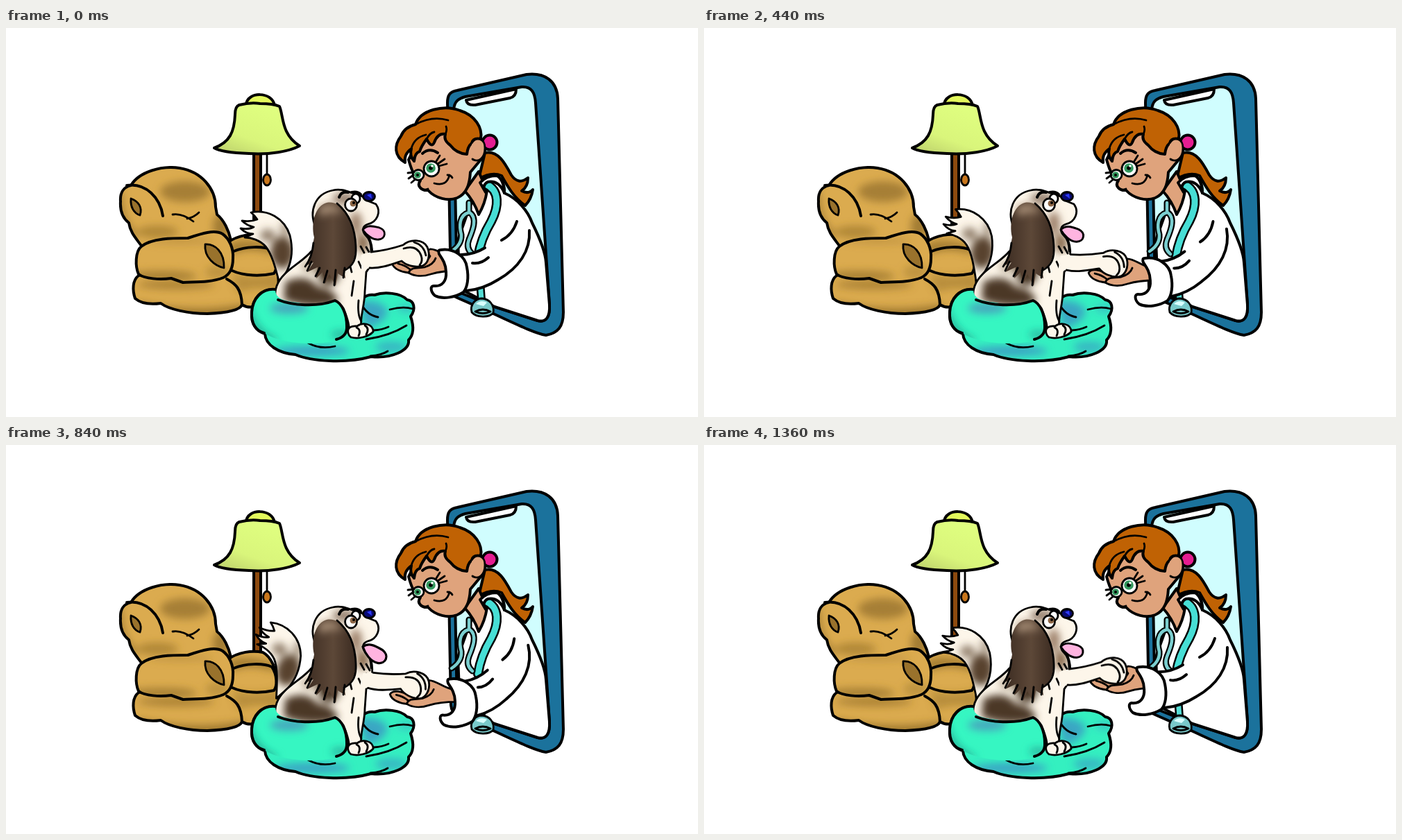
An HTML page that plays this animation: 997x561 px, repeating every 1400 ms.

```html
<!DOCTYPE html>
<html lang="en">
<head>
<meta charset="utf-8">
<title>Vet on the phone</title>
<style>
  html, body { margin: 0; height: 100%; overflow: hidden; background: #fff; }
  svg { display: block; width: 100%; height: 100%; }
  .ink { stroke: #000; stroke-width: 4; stroke-linejoin: round; stroke-linecap: round; }
  .thin { stroke-width: 2.8; }
  .line { fill: none; }
  .soft { filter: url(#blur); }
  .skin { fill: #dfa37c; }
  .hair { fill: #c06204; }
  .fur { fill: #fdf6ea; }
  .white { fill: #fff; }
</style>
</head>
<body>
<svg viewBox="0 0 997 561">
  <defs>
    <filter id="blur" x="-50%" y="-50%" width="200%" height="200%"><feGaussianBlur stdDeviation="6"/></filter>
    <linearGradient id="shadeFill" x1="0" y1="1" x2=".6" y2="0">
      <stop stop-color="#b9cc69"/><stop offset=".4" stop-color="#d9f57b"/><stop offset="1" stop-color="#e0ff80"/>
    </linearGradient>
    <linearGradient id="earFill">
      <stop stop-color="#3b2b21"/><stop offset=".55" stop-color="#5d4838"/><stop offset="1" stop-color="#3b2b21"/>
    </linearGradient>
    <path id="back" d="M180 227C192 207 225 198 250 202C282 207 302 232 302 258L304 269C314 277 321 292 324 306L300 330L195 314C187 303 179 295 177 281C168 274 164 265 165 250C164 237 170 229 180 227Z"/>
    <path id="seat" d="M318 310C335 298 355 296 370 299C382 305 390 324 392 345L393 380L357 402Q348 404 340 399C337 408 315 411 290 412C263 412 235 406 223 397C208 399 194 397 186 390C182 378 182 364 191 357Z"/>
    <path id="armrest" d="M195 315C210 303 240 303 262 303C280 297 300 290 312 297C322 304 328 318 327 332C327 346 322 356 313 360C296 367 272 366 255 367L238 361C222 363 200 362 191 355C186 344 186 322 195 315Z"/>
    <path id="tailShape" d="M394 368C388 345 383 326 374 315C366 306 353 302 344 302L356 297Q346 297 338 289Q350 291 357 287Q347 285 340 278Q352 280 362 276Q358 270 353 266C377 261 401 274 409 299C414 319 411 337 405 350Z"/>
    <path id="body" d="M440 322C425 340 398 350 390 372C384 388 392 400 402 404L486 404C492 418 496 430 494 440L512 432C509 420 517 400 517 380L519 352C529 340 531 318 522 300L490 275Z"/>
    <path id="head" d="M445 285C436 264 445 239 471 234C483 231 493 236 502 239C510 240 516 243 523 250L533 254C541 265 535 280 521 283C513 286 512 293 519 300C524 307 526 314 526 322L490 350L445 330Z"/>
    <path id="lobe" d="M388 377C369 375 355 390 354 410C353 426 360 437 372 440C395 455 440 458 472 452C486 450 492 442 491 430C491 412 484 397 474 393C457 401 438 400 420 396C400 394 388 390 388 377Z"/>
    <path id="bed" d="M385 378C368 376 355 390 354 410C353 426 360 437 373 441C374 457 392 469 417 471C440 481 490 484 526 474C556 477 582 465 580 450C590 440 586 425 583 416C591 405 588 393 578 392C569 382 545 380 531 385C519 383 511 391 507 400L400 400Z"/>
    <clipPath id="inBack"><use href="#back"/></clipPath>
    <clipPath id="inSeat"><use href="#seat"/></clipPath>
    <clipPath id="inArmrest"><use href="#armrest"/></clipPath>
    <clipPath id="inTail"><use href="#tailShape"/></clipPath>
    <clipPath id="inBody"><use href="#body"/></clipPath>
    <clipPath id="inHead"><use href="#head"/></clipPath>
    <clipPath id="inLobe"><use href="#lobe"/></clipPath>
    <clipPath id="inBed"><use href="#bed"/></clipPath>
  </defs>

  <g id="lamp" class="ink">
    <path d="M357 180H367V302H357Z" fill="#8d4a0e"/>
    <path class="line thin" d="M376 181V212"/>
    <ellipse class="thin" cx="376" cy="219" rx="5.5" ry="8" fill="#c8761c"/>
    <path d="M346 111C347 91 384 91 387 112Z" fill="#e3f95c"/>
    <path d="M336 111Q352 107 366 109Q385 109 394 113C400 126 396 153 423 170C408 178 380 183 350 181C325 180 308 178 300 173C322 165 329 150 330 125Q330 113 336 111Z" fill="url(#shadeFill)"/>
  </g>

  <g id="chair">
    <use href="#seat" fill="#dbab4f"/>
    <g clip-path="url(#inSeat)"><g class="soft" fill="#8f6b28">
      <path d="M320 312Q350 300 390 318L385 326Q350 314 325 326Z" opacity=".8"/>
      <path d="M325 355Q360 362 395 352V380Q360 370 335 382Z" opacity=".45"/>
      <path d="M190 395Q270 412 345 398V425H190Z" opacity=".8"/>
      <ellipse cx="245" cy="370" rx="55" ry="7" opacity=".6"/>
    </g></g>
    <use href="#seat" class="ink line"/>
    <use href="#back" fill="#dbab4f"/>
    <g clip-path="url(#inBack)"><g class="soft" fill="#94702b">
      <ellipse cx="258" cy="236" rx="36" ry="15" opacity=".75"/>
      <ellipse cx="218" cy="294" rx="30" ry="9" opacity=".6"/>
      <path d="M167 232Q165 270 190 300L178 302L155 245Z" opacity=".8"/>
      <ellipse cx="310" cy="286" rx="12" ry="18" opacity=".8"/>
    </g></g>
    <use href="#back" class="ink line"/>
    <use href="#armrest" fill="#dbab4f"/>
    <g clip-path="url(#inArmrest)"><g class="soft" fill="#94702b">
      <ellipse cx="225" cy="358" rx="50" ry="8" opacity=".7"/>
      <ellipse cx="250" cy="307" rx="48" ry="5" opacity=".35"/>
      <ellipse cx="305" cy="352" rx="18" ry="10" opacity=".4"/>
    </g></g>
    <use href="#armrest" class="ink line"/>
    <g class="ink line">
      <path d="M174 227C202 223 222 245 226 271"/>
      <path class="thin" d="M240 269C251 267 262 273 270 279M261 275Q271 273 278 266"/>
      <path d="M328 322C345 315 370 314 383 320C391 332 391 348 386 354C368 358 343 358 326 350"/>
      <path d="M318 362C331 369 339 376 340 399"/>
    </g>
    <path class="ink thin" d="M180 246C191 250 197 259 193 270C184 267 179 258 180 246ZM287 312C301 311 315 323 314 346C301 343 285 331 287 312Z" fill="#99722c"/>
  </g>

  <g id="tail">
    <use href="#tailShape" class="fur"/>
    <g clip-path="url(#inTail)"><g class="soft" fill="#59432d">
      <ellipse cx="398" cy="324" rx="17" ry="23"/>
      <ellipse cx="377" cy="299" rx="11" ry="9" opacity=".65"/>
      <ellipse cx="402" cy="290" rx="7" ry="12" opacity=".5"/>
    </g></g>
    <use href="#tailShape" class="ink thin line"/>
  </g>

  <g id="petBed">
    <use href="#bed" fill="#34f0c0"/>
    <g clip-path="url(#inBed)"><g class="soft" fill="#3a9fc4">
      <path d="M508 394Q540 390 550 408Q545 428 518 433Z" opacity=".9"/>
      <ellipse cx="440" cy="466" rx="55" ry="7"/>
      <ellipse cx="555" cy="460" rx="23" ry="8" opacity=".7"/>
      <ellipse cx="577" cy="405" rx="13" ry="4" opacity=".8"/>
    </g></g>
    <use href="#bed" class="ink line"/>
    <path class="ink thin line" d="M512 398Q520 414 536 417M553 406Q572 401 586 405M519 449Q553 444 577 429M530 436Q543 435 551 431M435 454Q452 464 474 459M525 473Q541 472 550 466"/>
  </g>

  <g id="dog">
    <use href="#body" class="fur"/>
    <g clip-path="url(#inBody)"><g class="soft">
      <path d="M402 366Q433 352 449 373Q480 378 477 398Q434 406 400 392Z" fill="#4b3826"/>
      <ellipse cx="440" cy="344" rx="15" ry="9" fill="#8e7960" opacity=".6"/>
      <ellipse cx="465" cy="350" rx="16" ry="22" fill="#4a3727"/>
      <ellipse cx="515" cy="311" rx="7" ry="14" fill="#8c694b"/>
    </g></g>
    <use href="#body" class="ink thin line"/>
    <use href="#lobe" fill="#36f6c2"/>
    <g clip-path="url(#inLobe)"><g class="soft">
      <ellipse cx="408" cy="404" rx="28" ry="8" fill="#47a6bd"/>
      <ellipse cx="482" cy="442" rx="14" ry="6" fill="#239b91" opacity=".7"/>
      <path d="M350 395Q358 437 395 450L370 455L345 415Z" fill="#23a28f" opacity=".85"/>
    </g></g>
    <path class="ink line" d="M388 377C369 375 355 390 354 410C353 426 360 437 372 440M392 392C412 400 448 403 474 393C484 397 491 412 491 430Q492 445 476 449"/>
    <path class="ink thin fur" d="M493 440C491 432 498 429 506 430C513 424 529 426 529 438C523 445 508 449 497 446Q494 444 493 440Z"/>
    <path class="ink thin line" d="M505 432Q512 435 508 444M517 429Q524 433 519 442M508 393Q506 414 512 423M501 365L498 386"/>

    <use href="#head" class="fur"/>
    <g clip-path="url(#inHead)"><g class="soft">
      <ellipse cx="487" cy="246" rx="17" ry="8" fill="#60452e" opacity=".7"/>
      <ellipse cx="504" cy="282" rx="9" ry="17" fill="#7d5c40" opacity=".75"/>
      <ellipse cx="514" cy="310" rx="9" ry="14" fill="#85664a"/>
    </g></g>
    <path class="ink thin line" d="M446 287C436 264 445 239 471 234C483 231 493 236 502 239Q514 241 523 250L533 254C541 265 535 280 521 283C513 286 512 293 519 300Q526 306 526 322"/>
    <path d="M462 252C446 256 439 280 444 302C440 323 440 331 431 343L443 338L434 352L449 345L447 361L456 352L460 369L466 355L475 372L478 354L489 361L487 348C505 343 506 315 502 296C499 270 481 248 462 252Z" fill="url(#earFill)"/>
    <path class="soft" d="M450 258Q472 247 486 268Q472 262 453 272Z" fill="#a58c74"/>
    <path class="ink thin line" d="M477 253C495 268 503 290 504 315C505 332 501 343 487 350M443 310Q441 331 431 344M440 337L434 350M452 346L446 358M463 350L458 367M475 349L473 371M488 346L486 360M496 344L498 352M511 315L516 324M519 316L524 325M508 337L512 346M519 330L524 340"/>
    <ellipse class="ink thin white" cx="504" cy="246" rx="6" ry="7"/>
    <ellipse class="ink thin white" cx="497" cy="255" rx="8.5" ry="9"/>
    <circle cx="500" cy="253" r="4.5" fill="#8c6544"/>
    <circle cx="501" cy="252" r="2"/>
    <path class="ink line" d="M480 244Q483 235 493 237M498 237Q506 235 511 240"/>
    <ellipse class="ink thin" cx="523" cy="243" rx="8.5" ry="6.5" fill="#090b76"/>
    <path d="M520 241L526 239L527 246Z" fill="#2e3bff"/>
    <path id="tongue" class="ink thin" d="M514 291C520 283 530 286 538 288C549 292 547 304 537 305C528 306 519 298 514 291Z" fill="#ffb4e0"/>
  </g>

  <g id="phone" class="ink">
    <path d="M636 108C636 96 640 92 650 90L750 67C776 64 794 76 795 102L803 410C803 431 795 440 778 443C761 440 735 427 700 411L650 389Q642 386 641 375Z" fill="#1b729c"/>
    <path d="M645 118C646 106 651 102 662 99L743 85C757 84 762 93 763 108L783 399C784 417 778 425 766 422L704 402L650 380Z" fill="#d0fdfe"/>
    <path class="white" d="M663 104Q664 112 676 111L726 101Q735 99 735 88Z"/>
  </g>

  <g id="doctor">
    <path class="ink hair" d="M690 180C709 176 719 195 728 212Q738 227 752 216Q752 229 743 235Q753 240 759 233Q757 247 748 256C732 245 723 229 714 213Q699 207 681 218Z"/>
    <path class="ink white" d="M688 218C702 207 719 214 718 238C737 246 752 264 758 281C769 303 777 323 778 338L783 399C784 417 778 425 766 422L704 402L654 376L651 306L668 258Z"/>
    <path class="ink skin" d="M661 235Q674 249 681 269Q690 254 693 235L681 207Z"/>
    <path class="ink skin" d="M580 190C584 203 586 212 597 220C591 228 599 235 608 234C619 246 637 250 650 245C664 239 668 225 669 208L684 190C698 166 688 154 671 162L642 145L600 150Z"/>
    <path class="ink hair" d="M575 194C559 185 559 169 569 156Q574 143 590 139C597 118 631 110 654 119C676 126 687 144 684 160Q673 158 671 166Q665 171 664 182Q649 181 640 169Q630 162 633 153Q622 151 617 165Q613 174 606 160Q598 171 596 178Q589 180 588 192Q581 185 584 174Q573 182 575 194Z"/>
    <path class="ink line thin" d="M590 139Q614 126 637 133M584 174Q588 158 605 154M606 160Q611 151 617 150M633 153Q636 147 634 142M674 177Q681 168 686 175M673 190Q679 184 681 190"/>
    <path class="ink line" d="M600 181Q610 172 622 180"/>
    <circle class="ink" cx="697" cy="165" r="10.5" fill="#e51d91"/>
    <path class="ink skin thin" d="M671 166C677 156 690 159 690 173C690 187 681 195 672 189"/>
    <g class="ink thin">
      <ellipse class="white" cx="594" cy="212" rx="8" ry="7.5"/>
      <ellipse class="white" cx="613" cy="203" rx="11" ry="11"/>
      <path class="line" d="M622 196L632 189M624 199L635 196M588 208L579 209M587 212L580 217M590 218L584 223M620 192L625 184"/>
      <path class="line" d="M597 220C590 227 599 236 608 232M617 224Q635 229 639 212M636 212Q641 212 643 216"/>
    </g>
    <circle cx="593" cy="212" r="4.8" fill="#33985e"/>
    <circle cx="612" cy="202" r="6.8" fill="#33985e"/>
    <circle cx="593" cy="212" r="2"/><circle cx="612" cy="202" r="2.8"/>
    <circle cx="614" cy="199" r="1.8" fill="#fff"/>

    <g class="line" stroke-linecap="round">
      <path d="M691 225C712 234 710 258 699 279Q684 304 680 330" stroke="#000" stroke-width="14"/>
      <path d="M691 225C712 234 710 258 699 279Q684 304 680 330" stroke="#47ded5" stroke-width="9"/>
      <path d="M667 252V264M667 266C652 270 653 287 656 298Q657 312 642 322M668 266C680 274 672 293 667 305Q662 318 672 326" stroke="#000" stroke-width="9"/>
      <path d="M667 252V264M667 266C652 270 653 287 656 298Q657 312 642 322M668 266C680 274 672 293 667 305Q662 318 672 326" stroke="#7bcfd0" stroke-width="4.5"/>
      <path d="M683 366L685 392" stroke="#000" stroke-width="12"/>
      <path d="M683 366L685 392" stroke="#55ddd5" stroke-width="7"/>
    </g>
    <path class="ink white" d="M683 223Q692 213 707 213Q717 218 718 238Q710 219 694 222Q685 227 691 237Z"/>
    <path class="ink thin" d="M671 410C668 398 677 390 686 390C697 391 704 400 702 411C696 418 678 418 671 410Z" fill="#79c9ca"/>
    <path d="M677 398Q684 391 693 396L688 401Z" fill="#d9ffff"/>
    <path class="ink thin line" d="M676 409Q687 403 698 409Q687 414 676 409Z"/>

    <g id="hand">
      <path class="ink skin thin" d="M556 339C560 332 574 335 584 341C600 340 609 334 611 329Q604 321 611 319C621 318 632 329 646 332L652 350C633 350 622 352 612 355C600 359 588 358 580 353C569 352 558 347 556 339Z"/>
      <path class="ink line thin" d="M580 353C583 344 594 347 603 345Q616 341 619 332M565 340Q575 342 582 348"/>
    </g>
    <g id="sleeve">
      <path class="white" d="M650 325Q676 329 700 308L730 280L754 295C756 321 739 346 709 363Q686 376 661 378Z"/>
      <path class="ink line" d="M754 292C756 321 739 346 709 363Q687 377 663 379M655 327Q674 327 690 317M672 339Q684 341 695 331M714 306Q730 298 736 279"/>
    </g>
    <path id="cuff" class="ink white" d="M626 320C645 317 662 329 664 345C667 360 665 374 659 381C648 388 630 392 618 386C611 380 611 371 617 372C629 373 635 364 634 352C634 340 628 332 624 326Q622 320 626 320Z"/>
  </g>

  <g id="paw">
    <path class="fur" d="M512 327L526 323C545 321 560 317 572 313C582 304 601 304 607 316C612 328 608 340 600 343C588 346 576 342 570 336C555 341 540 347 524 346L512 350Z"/>
    <path class="ink thin line" d="M526 323C545 321 560 317 572 313C582 304 601 304 607 316C612 328 608 340 600 343C588 346 576 342 570 336C555 341 540 347 524 346M573 318Q592 312 598 328Q601 336 596 342M588 309Q602 313 605 328"/>
  </g>
</svg>
<script>
  const LOOP = 1400, STEP = 40, STEPS = 34;
  const part = id => document.getElementById(id);
  const [tail, tongue, hand, sleeve, cuff, paw] = ["tail", "tongue", "hand", "sleeve", "cuff", "paw"].map(part);
  const pose = (el, transform) => el.setAttribute("transform", transform);
  const swing = turns => (1 - Math.cos(2 * Math.PI * turns)) / 2;

  function draw(now) {
    // The rest pose holds for two steps at the start of each loop.
    const u = Math.max(0, Math.floor((now % LOOP) / STEP) - 1) / STEPS;
    const shake = swing(u), wag = swing(4 * u);
    pose(tail, `rotate(${22 * wag} 400 352)`);
    pose(tongue, `translate(514 291) rotate(${20 * wag}) scale(${1 + 0.22 * wag}) translate(-514 -291)`);
    pose(paw, `rotate(${15 * shake} 505 338)`);
    pose(hand, `translate(${-3 * shake} ${22 * shake})`);
    pose(sleeve, `rotate(${-11 * shake} 735 300)`);
    pose(cuff, `translate(${14 * shake} ${19 * shake})`);
    requestAnimationFrame(draw);
  }
  draw(performance.now());
</script>
</body>
</html>
```
